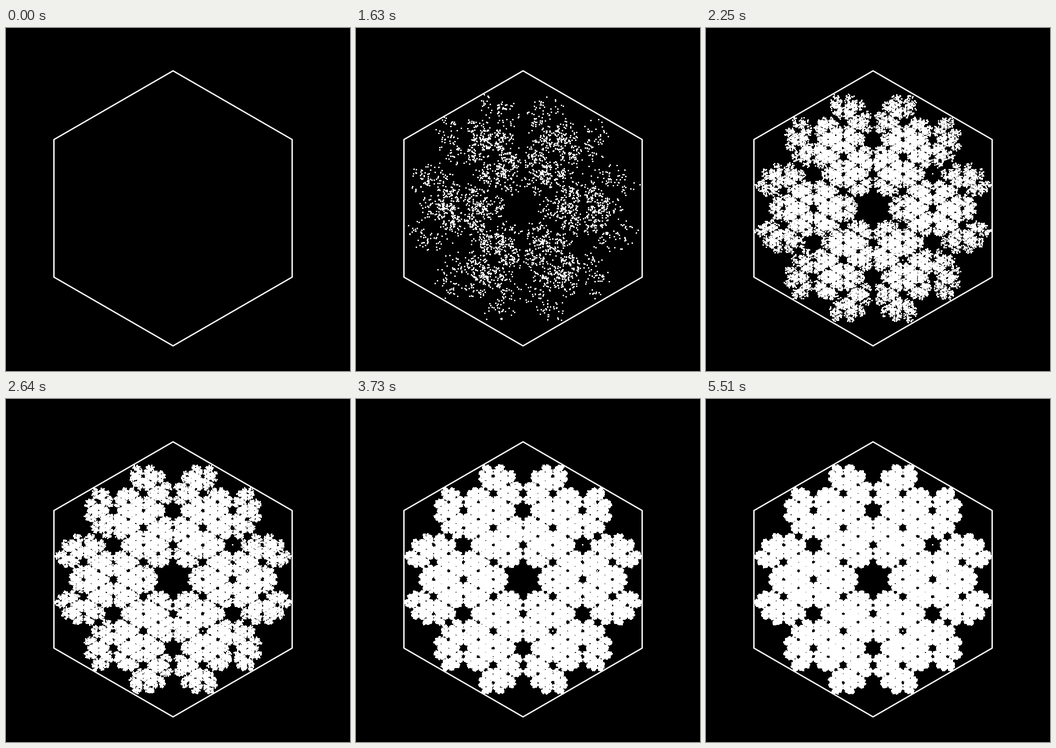
An HTML page with a canvas for the animation above (5.59 s loop, 749x747 px).

```html
<!DOCTYPE html>
<html lang="en">
<head>
<meta charset="utf-8">
<title>Chaos game in a hexagon</title>
<style>
html, body { margin: 0; height: 100%; overflow: hidden; background: #000; }
canvas { display: block; }
</style>
</head>
<body>
<canvas id="stage" width="749" height="747"></canvas>
<script>
const W = 749, H = 747, LOOP = 5590;
const CX = 363.7, CY = 392.8, R = 299.5;
const START = 380, SLOW = 3480;
const ctx = document.getElementById('stage').getContext('2d');

const corners = Array.from({ length: 6 }, (_, i) => {
  const a = i * Math.PI / 3;
  return [CX + R * Math.sin(a), CY - R * Math.cos(a)];
});

// The picture refreshes quickly at first, then at a slower pace
function lastRefresh(t) {
  const [from, step] = t < SLOW ? [START, 76] : [SLOW, 203];
  return from + Math.floor((t - from) / step) * step;
}

// Exponential growth that settles into a steady rate
function dotCount(t) {
  if (t < START) return 0;
  return Math.round(60000 * Math.log1p(Math.exp((t - 2090) * 0.0055)));
}

let seed = 20117;
function random() {
  seed = (seed + 0x6D2B79F5) | 0;
  let r = Math.imul(seed ^ (seed >>> 15), 1 | seed);
  r = (r + Math.imul(r ^ (r >>> 7), 61 | r)) ^ r;
  return ((r ^ (r >>> 14)) >>> 0) / 4294967296;
}

// For each pixel: the number of the first dot that covers it.
// Jump halfway to a random corner, never the same corner twice in a row.
const birth = new Uint32Array(W * H).fill(0xFFFFFFFF);
const opening = [1, 3, 1];
const total = dotCount(LOOP);
let x = CX, y = CY, corner = 0;
for (let n = 1; n <= total; n++) {
  corner = opening[n - 1] ?? (corner + 1 + Math.floor(random() * 5)) % 6;
  x = (x + corners[corner][0]) / 2;
  y = (y + corners[corner][1]) / 2;
  const mid = Math.floor(y) * W + Math.floor(x);
  for (let row = -W; row <= W; row += W) {
    for (let p = mid + row - 1; p <= mid + row + 1; p++) {
      if (birth[p] > n) birth[p] = n;
    }
  }
}

const image = ctx.createImageData(W, H);
const pixels = new Uint32Array(image.data.buffer);
ctx.strokeStyle = '#fff';
ctx.lineWidth = 3;
ctx.lineJoin = 'round';

let shown = -1;
function draw(t) {
  const count = dotCount(lastRefresh(t));
  if (count === shown) return;
  shown = count;
  for (let p = 0; p < pixels.length; p++) {
    pixels[p] = birth[p] <= count ? 0xFFFFFFFF : 0xFF000000;
  }
  ctx.putImageData(image, 0, 0);
  ctx.beginPath();
  corners.forEach(c => ctx.lineTo(...c));
  ctx.closePath();
  ctx.stroke();
}

const start = performance.now();
function loop() {
  draw((performance.now() - start) % LOOP);
  requestAnimationFrame(loop);
}
loop();
</script>
</body>
</html>
```
